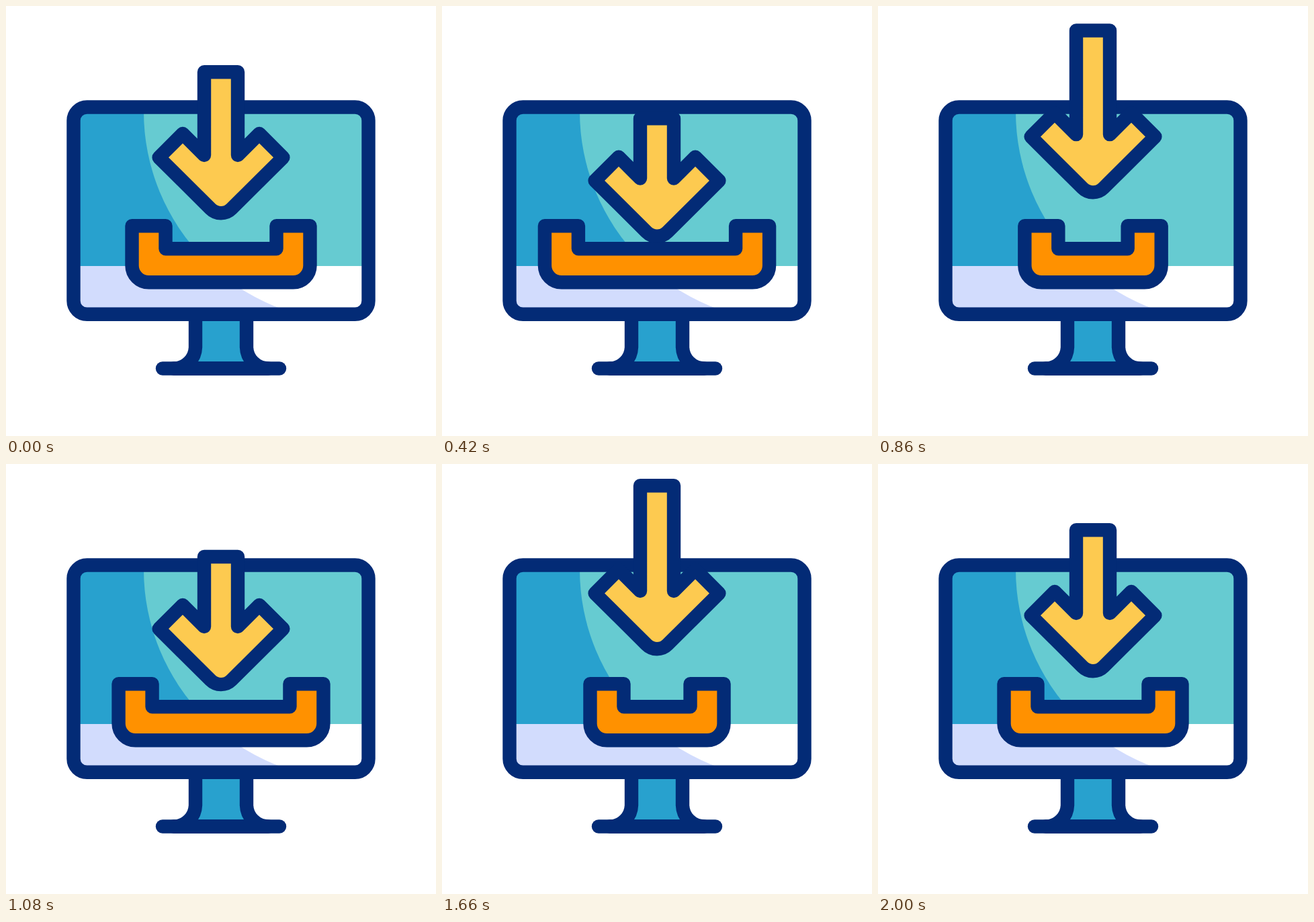
An HTML page for the animation above (2420 ms loop, 640 by 640 pixels).

```html
<!DOCTYPE html>
<html lang="en">
<head>
<meta charset="utf-8">
<title>Download to computer</title>
<style>
  html, body { margin: 0; height: 100%; overflow: hidden; background: #fff; }
  svg { display: block; width: 100%; height: 100%; }
  .line { stroke: #032b76; stroke-width: 20.4; stroke-linecap: round; stroke-linejoin: round; }
</style>
</head>
<body>
<svg viewBox="0 0 640 640">
  <clipPath id="screen"><rect x="100.5" y="150.5" width="439" height="308.3" rx="20"/></clipPath>
  <path class="line" fill="#28a1ce" d="M282 459V507A32.5 32.5 0 0 1 249.5 539.5H390.5A32.5 32.5 0 0 1 358 507V459"/>
  <path class="line" d="M233 539.5H407"/>
  <g clip-path="url(#screen)">
    <path fill="#28a1ce" d="M100 150H540V387H100z"/>
    <path fill="#d2dcfd" d="M100 387H540V459H100z"/>
    <clipPath id="glare"><circle cx="518" cy="157" r="313"/></clipPath>
    <g clip-path="url(#glare)">
      <path fill="#66cbd1" d="M100 150H540V387H100z"/>
      <path fill="#fff" d="M100 387H540V459H100z"/>
    </g>
  </g>
  <rect class="line" fill="none" x="100.5" y="150.5" width="439" height="308.3" rx="20"/>
  <path class="line" id="tray" fill="#ff9100"/>
  <path class="line" id="arrow" fill="#fdca50"/>
</svg>
<script>
  const LOOP = 2420, STEP = 20, BEAT = 400, REACH = 35.1;
  const swings = [0, 1, -1, 1, -1, 0];
  const tray = document.getElementById('tray');
  const arrow = document.getElementById('arrow');

  // Eased swing between successive extremes, then a rest
  function offset(t) {
    const i = Math.floor(t / BEAT);
    if (i >= swings.length - 1) return 0;
    const p = t / BEAT - i, ease = p * p * (3 - 2 * p);
    return REACH * (swings[i] + (swings[i + 1] - swings[i]) * ease);
  }

  function draw(now) {
    const d = offset(Math.floor(now % LOOP / STEP) * STEP);
    const left = 187.5 - d, right = 452.5 + d;
    tray.setAttribute('d', `M${left} 327.3h50v34H${right - 50}v-34h50V386.3
      a25 25 0 0 1 -25 25H${left + 25}a25 25 0 0 1 -25 -25z`);
    // The tail travels twice as far as the head
    arrow.setAttribute('d', `M295 ${98.2 + 2 * d}H345V${222 + d}l32 -32l35.4 35.4
      l-76.8 76.3a22 22 0 0 1 -31.2 0l-76.8 -76.3l35.4 -35.4l32 32z`);
  }

  const start = performance.now();
  function tick() {
    draw(performance.now() - start);
    requestAnimationFrame(tick);
  }
  tick();
</script>
</body>
</html>
```
